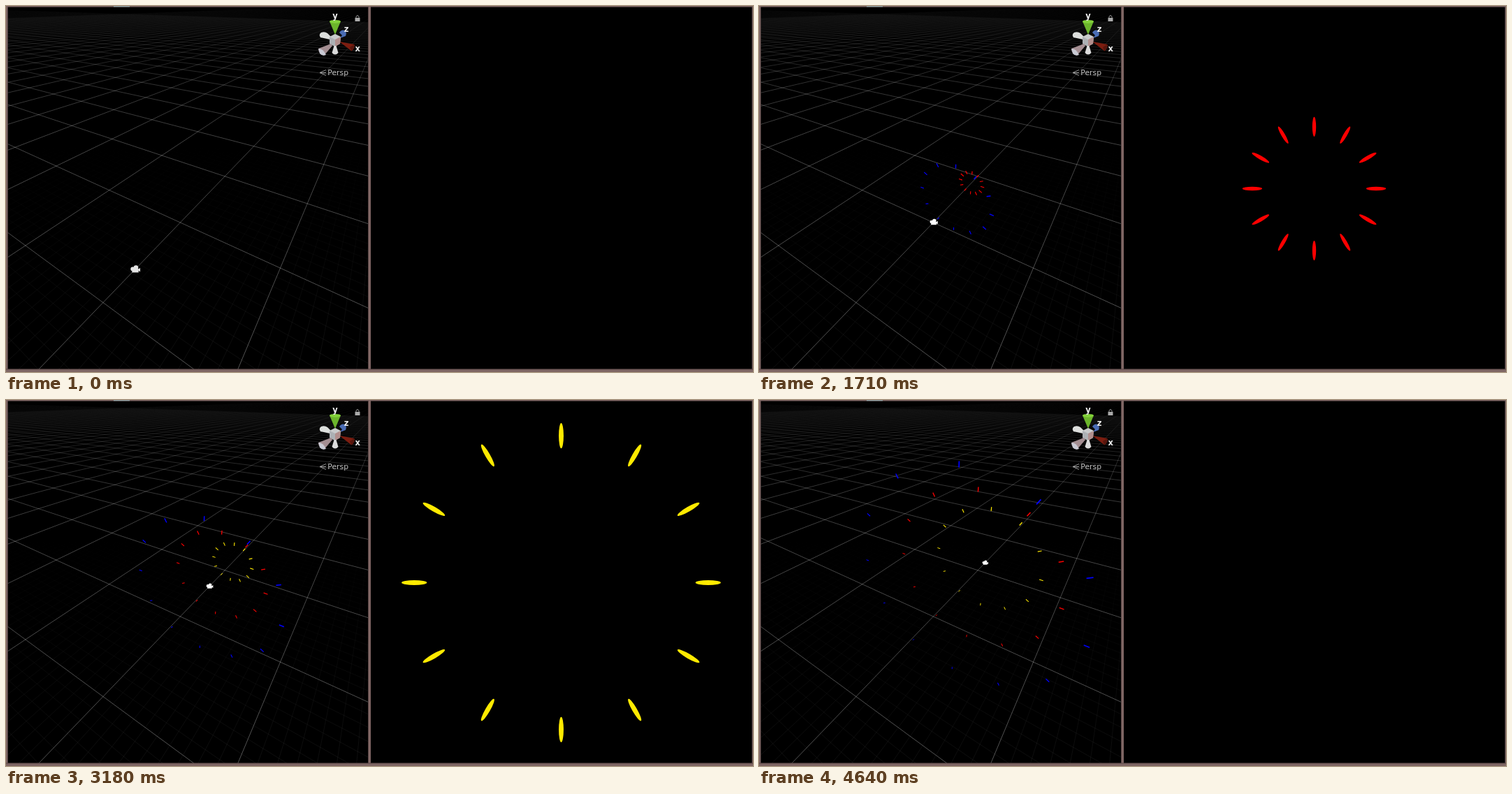
These frames come from a looping animation (1069 px wide and 524 px high, 4.72 s). An HTML page with a canvas:

```html
<!DOCTYPE html>
<html lang="en">
<head>
<meta charset="utf-8">
<title>Expanding rings</title>
<style>
html, body { margin: 0; width: 100%; height: 100%; overflow: hidden; background: #000; }
canvas, svg { position: absolute; left: 0; top: 0; display: block; }
text { font-family: "DejaVu Sans", sans-serif; fill: #eee; }
.axis { font-size: 11.5px; font-weight: bold; text-anchor: middle; }
</style>
</head>
<body>
<canvas id="view" width="1069" height="524"></canvas>
<svg width="1069" height="524" viewBox="0 0 1069 524">
  <g fill="#7f6664">
    <path d="M0 0H1069V1.5H0Z M0 0H2.6V524H0Z M518.5 0H522V524H518.5Z M1067.6 0H1069V524H1067.6Z M0 520H1069V524H0Z"/>
  </g>
  <path d="M0 520H1069 M518.5 1V520" stroke="#5a4746" fill="none"/>
  <rect x="154" width="23" height="1.3" fill="#93a3a6"/>
  <g id="gizmo">
    <path d="M481 42L477 38Q480 33 485 35Q488 38 486 43L478 46Z" fill="#4a6cb4"/>
    <path d="M464 48L450 45Q447 41 451 38Q456 36 460 39L466 45Z" fill="#dcdedc"/>
    <path d="M463 22L471 41L479 22Z" fill="#6cb52c"/>
    <ellipse cx="471" cy="22.3" rx="8" ry="2.4" fill="#83d23a"/>
    <path d="M477 51L498.5 55Q499.5 60 494.5 64.5Z" fill="#7c1d10"/>
    <path d="M498.5 55Q499.5 61 494.5 64.5L492 59Z" fill="#57160d"/>
    <path d="M463 44L471 40L479 44L478 54L471 58L463 54Z" fill="#c9cbcc"/>
    <path d="M471 48L479 44L478 54L471 58Z" fill="#b28f8d"/>
    <path d="M463 44L471 48V58L463 54Z" fill="#adb1b5"/>
    <path d="M465 54L447 61Q447 68 455 71L467 57Z" fill="#a48e92"/>
    <path d="M447 61Q454 61 458 70Q452 72 449 68Z" fill="#c9cad4"/>
    <path d="M469.5 57L466.5 67Q471 72 475.500 67L472.500 57Z" fill="#dcdcdc"/>
  </g>
  <text class="axis" x="471" y="17.5">y</text>
  <text class="axis" x="487" y="36.5">z</text>
  <text class="axis" x="503.3" y="65">x</text>
  <rect x="499.5" y="17" width="7" height="5" fill="#aaa"/>
  <path d="M501 17V15.5Q503 11.5 505 15.5V17" fill="none" stroke="#999"/>
  <path d="M458 91.5L449 95.5L458 99.5M449 95.5H458" fill="none" stroke="#aaa" stroke-width=".9"/>
  <text x="460.3" y="99.3" font-size="10.8" style="fill:#c4c4c4">Persp</text>
</svg>
<script>
const LOOP = 4720, STEP = 77.4, LEAD = 15;
const canvas = document.getElementById('view');
const ctx = canvas.getContext('2d');

const CLOCK = [[0, 0], [7, 7.1], [8, 8.05], [14, 14.3], [16, 15.85], [28, 27.6], [41, 40.4], [52, 51.7], [60, 59.7]];
const RINGS = [
  { color: '#00f', depth: 0.42, birth: 3.1 },
  { color: '#f00', depth: 0.82, birth: 15.5 },
  { color: '#ffea00', depth: 1.22, birth: 28.9 }
];
const GROWTH = 0.0238, LENGTH = 0.0472, FOCAL = 483, SPOKES = 12;

function clockAt(step) {
  let i = 1;
  while (i < CLOCK.length - 1 && CLOCK[i][0] < step) i++;
  const [a, ta] = CLOCK[i - 1], [b, tb] = CLOCK[i];
  return ta + (tb - ta) * (step - a) / (b - a);
}

// Perspective of the scene view: u across, v along the track, h upwards.
const WU = -0.1695, WV = 0.268, WH = -0.229;
function project(u, v, h = 0) {
  const w = 1 + WU * u + WV * v + WH * h;
  return {
    x: (249.4 + 76.6 * u + 147.7 * v - 60.3 * h) / w,
    y: (310 + 1.6 * u - 0.8 * v - 174.9 * h) / w,
    w
  };
}

function clipTo(c, x, y, w, h) {
  c.beginPath();
  c.rect(x, y, w, h);
  c.clip();
}

function segment(c, a, b) {
  c.beginPath();
  c.moveTo(a.x, a.y);
  c.lineTo(b.x, b.y);
  c.stroke();
}

function fade(c, stops) {
  const g = c.createLinearGradient(0, 0, 0, 520);
  for (const [y, alpha] of stops) g.addColorStop(y / 520, `rgba(255,255,255,${alpha})`);
  return g;
}

function gridLines(c, step, [u0, u1], [v0, v1]) {
  const near = 0.25;
  for (let i = Math.round(u0 / step); i <= u1 / step; i++) {
    const u = i * step;
    segment(c, project(u, (near - 1 - WU * u) / WV), project(u, 300));
  }
  for (let i = Math.round(v0 / step); i <= v1 / step; i++) {
    const v = i * step;
    segment(c, project((near - 1 - WV * v) / WU, v), project(-300, v));
  }
}

function makeGrid() {
  const layer = document.createElement('canvas');
  layer.width = 520;
  layer.height = 524;
  const c = layer.getContext('2d');
  clipTo(c, 2.6, 1.5, 516, 518.5);
  c.lineWidth = 1;
  c.strokeStyle = fade(c, [[0, 0], [190, 0], [340, 0.025], [520, 0.055]]);
  gridLines(c, 0.1, [-4, 2.6], [-2.5, 3]);
  c.strokeStyle = fade(c, [[0, 0], [10, 0.012], [25, 0.04], [60, 0.11], [120, 0.2], [200, 0.26], [520, 0.28]]);
  gridLines(c, 1, [-40, 4], [-5, 40]);
  return layer;
}
const grid = makeGrid();

function eachSpoke(draw) {
  for (let i = 0; i < SPOKES; i++) draw(i * 2 * Math.PI / SPOKES);
}

function sceneRing(ring, radius) {
  ctx.strokeStyle = ring.color;
  eachSpoke(a => {
    const at = r => project(r * Math.cos(a), ring.depth, r * Math.sin(a));
    const inner = at(radius - LENGTH / 2), outer = at(radius + LENGTH / 2);
    ctx.lineWidth = 1.4 / outer.w;
    segment(ctx, inner, outer);
  });
}

function gameRing(ring, radius, distance) {
  if (distance < 0.05) return;
  const scale = FOCAL / distance, half = LENGTH / 2 * scale;
  ctx.fillStyle = ring.color;
  eachSpoke(a => {
    const r = radius * scale;
    ctx.beginPath();
    ctx.ellipse(794.5 + r * Math.cos(a), 261.5 + r * Math.sin(a), half, half * 0.19, a, 0, 7);
    ctx.fill();
  });
}

function cameraIcon(v) {
  const p = project(0, v), s = 0.77 / p.w;
  ctx.save();
  ctx.translate(p.x, p.y);
  ctx.scale(s, s);
  ctx.fillStyle = v < -0.6 ? '#e4e4e4' : '#fff';
  ctx.beginPath();
  ctx.arc(-4, -0.3, 3.2, 0, 7);
  ctx.arc(1, -2.3, 3.6, 0, 7);
  ctx.rect(-5, -0.5, 10, 5.5);
  ctx.fill();
  ctx.beginPath();
  ctx.moveTo(3, 1);
  ctx.lineTo(7.5, -2);
  ctx.lineTo(7.5, 4);
  ctx.fill();
  ctx.restore();
}

function inView(x, w, draw) {
  ctx.save();
  clipTo(ctx, x, 1.5, w, 518.5);
  draw();
  ctx.restore();
}

function render(ms) {
  const clock = clockAt(Math.min(60, Math.floor((ms % LOOP + LEAD) / STEP)));
  const eye = -0.661 + 0.031 * clock;
  const live = RINGS.filter(r => clock > r.birth);
  const radius = r => GROWTH * (clock - r.birth);

  ctx.fillStyle = '#000';
  ctx.fillRect(0, 0, 1069, 524);
  ctx.drawImage(grid, 0, 0);
  inView(2.6, 516, () => {
    live.forEach(r => sceneRing(r, radius(r)));
    cameraIcon(Math.max(-0.656, -0.685 + 0.0319 * clock));
  });
  inView(522, 545.6, () => live.forEach(r => gameRing(r, radius(r), r.depth - eye)));
}

const start = performance.now();
function tick() {
  render(performance.now() - start);
  requestAnimationFrame(tick);
}
tick();
</script>
</body>
</html>
```
